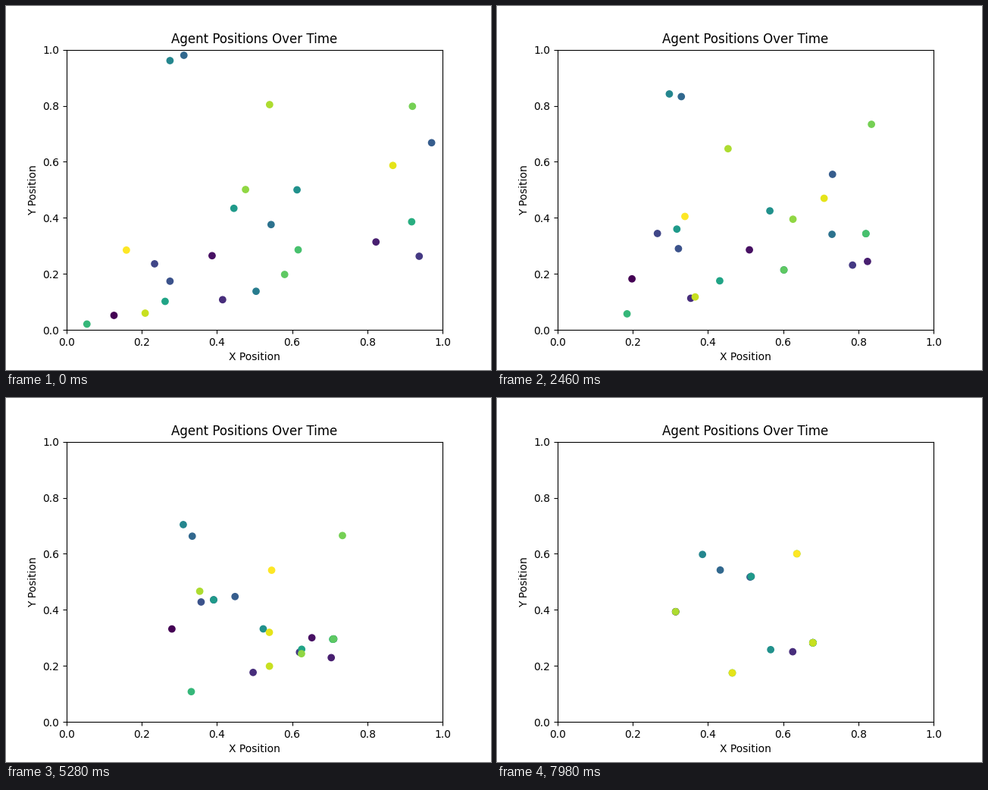
These frames come from a looping animation (640x480 px, 8000 ms). A matplotlib script:

```python
import numpy as np
import matplotlib.pyplot as plt
from matplotlib.animation import FuncAnimation

TICK = 20        # ms per drawn frame
HOLD = 3         # drawn frames per simulation step
FRAMES = 400     # 8 s loop

# Agents are named A to Y in colour order.
NAMES = "ABCDEFGHIJKLMNOPQRSTUVWXY"
STARTS = [
    (.126, .052), (.387, .265), (.823, .314), (.415, .108), (.938, .263),
    (.234, .236), (.275, .174), (.971, .668), (.312, .980), (.544, .376),
    (.504, .138), (.275, .961), (.613, .500), (.445, .434), (.262, .102),
    (.918, .386), (.054, .021), (.616, .286), (.580, .198), (.920, .798),
    (.476, .501), (.540, .804), (.209, .060), (.868, .587), (.159, .285),
]
# who is followed: by whom
FOLLOWERS = dict(N="HILT", R="BJK", E="CQU", V="AG", O="EP", P="OR", D="M",
                 W="D", F="N", Y="F", K="S", A="V", S="W", Q="X", T="Y")
# distance covered in one step: by whom
PACES = {.00218: "M", .0026: "CPT", .00296: "L", .00305: "BGKS",
         .00331: "DFQ", .00363: "AIN", .00382: "E", .00408: "W",
         .00438: "V", .0045: "OU", .00482: "JX", .00527: "Y",
         .00646: "H", .0071: "R"}


def by_member(groups):
    """Turn {value: members} into {member: value}."""
    return {name: value for value, team in groups.items() for name in team}


def simulate(steps):
    """In turn, every agent walks straight at its leader and stops on it."""
    leader, pace = by_member(FOLLOWERS), by_member(PACES)
    pos = dict(zip(NAMES, np.array(STARTS)))
    path = [np.array(STARTS)]
    for _ in range(steps):
        for name in NAMES:
            gap = pos[leader[name]] - pos[name]
            dist = np.hypot(*gap)
            if dist > 0:
                pos[name] = pos[name] + gap * min(1, pace[name] / dist)
        path.append(np.array([pos[name] for name in NAMES]))
    return path


path = simulate((FRAMES - 1) // HOLD)

fig, ax = plt.subplots(figsize=(6.4, 4.8), dpi=100)
dots = ax.scatter(*path[0].T, c=np.arange(len(NAMES)), cmap="viridis")
ax.set_xlim(0, 1)
ax.set_ylim(0, 1)
ax.set_title("Agent Positions Over Time")
ax.set_xlabel("X Position")
ax.set_ylabel("Y Position")


def update(i):
    dots.set_offsets(path[i // HOLD])
    return dots,


anim = FuncAnimation(fig, update, frames=FRAMES, interval=TICK,
                     repeat=True, repeat_delay=0)
plt.show()
```
